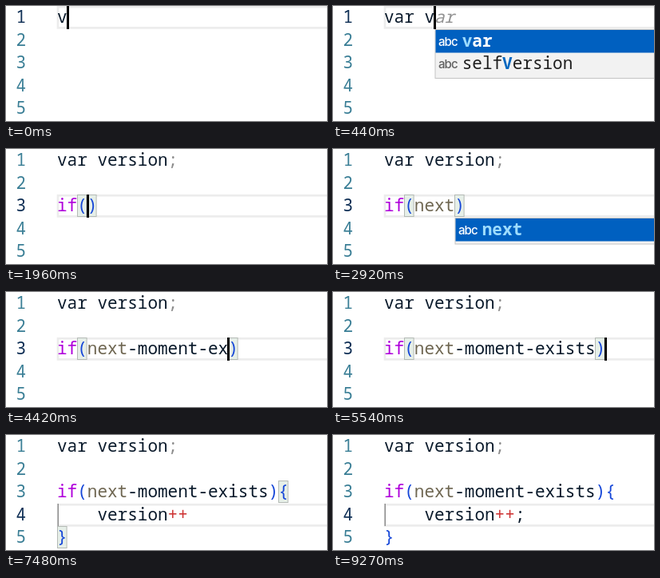
An HTML page that plays this animation: 402x144 px, repeating every 9.39 s.

```html
<!DOCTYPE html>
<html lang="en">
<head>
<meta charset="utf-8">
<title>Typing in a code editor</title>
<style>
  html, body { margin: 0; width: 100%; height: 100%; overflow: hidden; background: #fff; }
  svg { display: block; width: 402px; height: 144px; }
  text { font: 21px "Noto Sans Mono", "DejaVu Sans Mono", monospace; white-space: pre; }
  .icon { font: 500 15px Inter, "Open Sans", sans-serif; letter-spacing: -0.9px; }
  .chosen { font-weight: 600; }
  .hit { font-weight: 700; }
  .ghost { font-style: italic; }
</style>
</head>
<body>
<svg id="stage" viewBox="0 0 402 144"></svg>
<script>
const LOOP = 9390, LEFT = 63.6, CHAR = 12.6, ROW = 28.5;
const INK = "#0a1a2b", TAN = "#6f6752", BLUE = "#1546d8", SELECTED = "#0060c0";
const stage = document.getElementById("stage");

// Each step holds the time and whatever changes in the editor state.
const steps = [];
const step = (time, change) => steps.push({ time, change });
const open = (words, typed) => ({ words: words.split(" "), typed });

const first = (time, text, popup = null) =>
  step(time, { row: 0, lines: { 0: text }, col: text.length, popup, blink: false });
const condition = (time, inner, popup = null) =>
  step(time, { row: 2, lines: { 2: `if(${inner})` }, col: 3 + inner.length, popup, blink: false });
const body = (time, text, popup = null) =>
  step(time, { row: 3, lines: { 3: "    " + text }, col: 4 + text.length, popup, blink: false });
const blink = (time, hidden) => step(time, { blink: hidden });

first(0, "v");
first(60, "v", open("var selfVersion", "v"));
first(140, "va", open("var", "va"));
first(220, "var", open("var", "var"));
first(310, "var ");
first(440, "var v", open("var selfVersion", "v"));
first(500, "var ve", open("selfVersion", "ve"));
first(620, "var ver", open("selfVersion", "ver"));
first(840, "var vers", open("selfVersion", "vers"));
first(930, "var versi", open("selfVersion", "versi"));
first(1020, "var version", open("selfVersion", "version"));
first(1360, "var version;");
step(1420, { row: 1, col: 0 });
step(1490, { row: 2, col: 0 });
step(1660, { lines: { 2: "i" }, col: 1 });
step(1750, { lines: { 2: "if" }, col: 2 });
condition(1910, "");
condition(2080, "n", open("next", "n"));
condition(2300, "ne", open("next", "ne"));
condition(2420, "next", open("next", "next"));
blink(2920, true);
condition(3080, "next-", open("next", "next"));
condition(3140, "next-m", open("moment", "m"));
condition(3210, "next-mo", open("moment", "mo"));
[3360, 3460, 3570, 3680].forEach((time, i) => {
  const typed = "moment".slice(0, 3 + i);
  condition(time, "next-" + typed, open("moment", typed));
});
condition(4080, "next-moment-");
condition(4200, "next-moment-e");
[4420, 4490, 4600, 4710, 4890].forEach((time, i) =>
  condition(time, "next-moment-" + "exists".slice(0, 2 + i)));
blink(5420, true);
step(5510, { col: 22, blink: false });
step(5610, { lines: { 2: "if(next-moment-exists){}" }, col: 23 });
step(6010, { row: 3, col: 4, lines: { 2: "if(next-moment-exists){", 4: "}" } });
body(6070, "v", open("version", "v"));
[[6230, 2], [6360, 3], [6450, 4], [6540, 5], [6640, 7]].forEach(([time, n]) => {
  const typed = "version".slice(0, n);
  body(time, typed, open("version", typed));
});
body(6890, "version+");
body(7020, "version++");
blink(7480, true);
body(7570, "version++;");
blink(8030, true);
blink(8560, false);
blink(9020, true);
step(9270, { blurred: true });

function stateAt(index) {
  const state = { lines: ["", "", "", "", ""], row: 0, col: 0 };
  for (const { change } of steps.slice(0, index + 1)) {
    const lines = Object.assign(state.lines, change.lines);
    Object.assign(state, change, { lines });
  }
  return state;
}

const rect = (x, y, w, h, fill, extra = "") =>
  `<rect x="${x}" y="${y}" width="${w}" height="${h}" fill="${fill}" ${extra}/>`;
const text = (x, y, value, fill, kind = "") =>
  `<text x="${x}" y="${y}" fill="${fill}" class="${kind}">${value}</text>`;
const columnX = col => LEFT + col * CHAR;
const baseline = row => 21 + row * ROW;

function tokenColor(token, row) {
  if (token === "if") return "#af00db";
  if (/[(){}]/.test(token)) return BLUE;
  if (/^\++$/.test(token)) return "#cd3131";
  if (token === ";" && row === 0) return "#8c8c8c";
  return "next".startsWith(token) ? TAN : INK;
}

function drawLine(line, row) {
  return [...line.matchAll(/\w+|\++|[^\s\w+]/g)].map(match =>
    text(columnX(match.index) + 0.4, baseline(row), match[0], tokenColor(match[0], row))).join("");
}

function drawCurrentLine(row) {
  const y = Math.round(row * ROW);
  return rect(65, y + 1.2, 345, 26.2, "none", 'stroke="#ececec" stroke-width="2.6"');
}

function drawBrackets({ lines }) {
  const line = lines[2];
  if (!line.includes("(")) return "";
  const brace = line.indexOf("{");
  const pair = brace < 0 ? [[2, 2], [2, line.indexOf(")")]]
    : [[2, brace], lines[4] ? [4, 0] : [2, brace + 1]];
  return pair.map(([row, col]) =>
    rect(Math.round(columnX(col)) + 0.5, Math.round(row * ROW) + 0.5, 11.6, 27, "#e6efe8",
      'stroke="#b4bab5"')).join("");
}

function drawPopup({ popup, row, col }) {
  const x = Math.round(columnX(col)) + 1;
  const top = Math.round((row + 1) * ROW) + 0.5;
  const { words, typed } = popup;
  let out = rect(x, top, 420, words.length * ROW + 4, "#f2f2f2", 'stroke="#c4c4c4"');
  words.forEach((word, i) => {
    const y = top + 1 + i * (ROW - 0.5);
    const chosen = i === 0;
    const at = word.toLowerCase().indexOf(typed);
    const end = at + typed.length;
    const fill = chosen ? "#fff" : "#1f1f1f";
    if (chosen) out += rect(x + 0.5, y - 0.5, 420, ROW, SELECTED);
    out += text(x + 4, y + 19, "abc", chosen ? "#fff" : "#606060", "icon");
    const part = (from, to, color, kind) => from < to
      ? text(x + 33.7 + from * CHAR, y + 20.5, word.slice(from, to), color, kind) : "";
    const plain = chosen ? "chosen" : "";
    out += part(0, at, fill, plain) + part(at, end, chosen ? "#9ddcff" : "#0066bf", "hit")
      + part(end, word.length, fill, plain);
  });
  return out;
}

function drawGhost({ popup, row, col }) {
  const [word] = popup.words;
  if (row === 2 || !word.startsWith(popup.typed)) return "";
  return text(columnX(col) + 0.4, baseline(row), word.slice(popup.typed.length), "#929292", "ghost");
}

function draw(state) {
  const { lines, row, col, popup, blink, blurred } = state;
  let out = rect(0, 0, 402, 144, "#fff") + drawCurrentLine(row);
  if (row === 3) out += rect(64.5, 86, 1.5, 28, "#8f8f8f");
  if (!blurred) out += drawBrackets(state);
  lines.forEach((line, i) => {
    out += text(12.5, baseline(i), i + 1, i === row ? "#0f2f55" : "#3b7f96");
    out += drawLine(line, i);
  });
  if (popup) out += drawGhost(state) + drawPopup(state);
  if (!blink && !blurred) out += rect(Math.floor(columnX(col)), Math.round(row * ROW), 3, 29, "#000");
  stage.innerHTML = out;
}

let shown = -1;
const start = performance.now();
function update() {
  const time = (performance.now() - start) % LOOP;
  const index = steps.filter(s => s.time <= time).length - 1;
  if (index !== shown) draw(stateAt(shown = index));
  requestAnimationFrame(update);
}
update();
</script>
</body>
</html>
```
